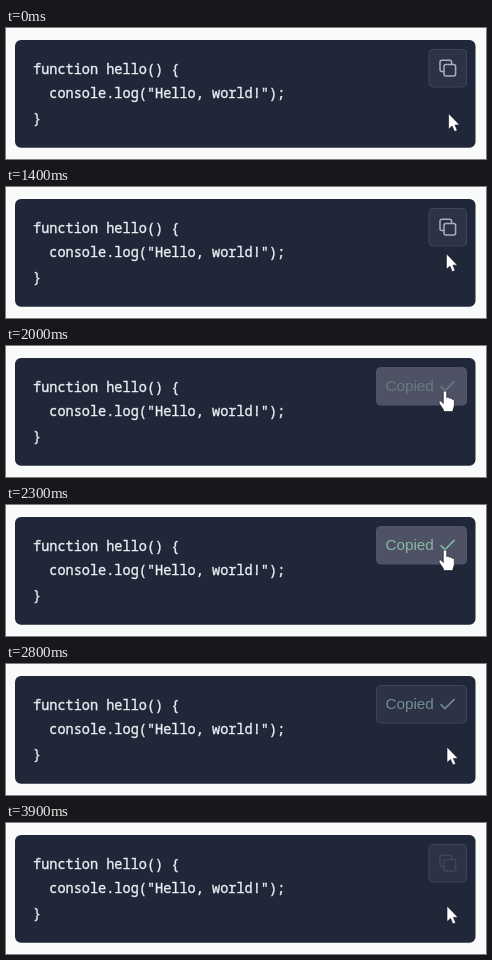
An HTML page that plays this animation: 480x131 px, repeating every 4 s.

```html
<!DOCTYPE html>
<html lang="en">
<head>
<meta charset="utf-8">
<title>Copy button</title>
<style>
  html, body { margin: 0; width: 100%; height: 100%; overflow: hidden; background: #f9fafa; }
  svg { display: block; width: 100vw; height: 100vh; }
  .code text { font: 13.57px "Noto Sans Mono", monospace; fill: #eceef2; stroke: #eceef2; stroke-width: .35; white-space: pre; }
  .label { font: 15.3px "Liberation Sans", Arial, sans-serif; }
  .line { fill: none; stroke-width: 1.5; stroke-linecap: round; stroke-linejoin: round; }
  .cursor { fill: #fff; stroke: #10141e; stroke-width: .6; stroke-linejoin: round; }
</style>
</head>
<body>
<svg viewBox="0 0 480 131">
  <rect x="9" y="12" width="460.5" height="107.7" rx="6" fill="#202739"/>
  <g class="code">
    <text x="27" y="46.4">function hello() {</text>
    <text x="27" y="70.4">  console.log("Hello, world!");</text>
    <text x="27" y="94.6">}</text>
  </g>
  <rect id="button" y="21.5" height="37.5" rx="4"/>
  <g id="icon" class="line">
    <rect x="438" y="36.6" width="11.6" height="11.4" rx="2"/>
    <path d="M437.8 43.4H436a2 2 0 0 1-2-2V34.2a2 2 0 0 1 2-2h7.6a2 2 0 0 1 2 2v2.2"/>
  </g>
  <g id="done">
    <text id="label" class="label" x="379.4" y="45">Copied</text>
    <path id="check" class="line" d="M435 40.6l4 4 9.2-9.2"/>
  </g>
  <path id="arrow" class="cursor" d="M0 0V15.6L3.5 12.4 5.9 18 8.7 16.8 6.4 11.4H11Z"/>
  <path id="hand" class="cursor" d="M-1.7 1.1C-1.7-1 1.7-1 1.7 1.1V6.2C2.3 5.4 4.3 5.6 4.5 6.9 5.3 6.2 6.9 6.6 7.1 7.9 8.1 7.4 9.3 8 9.3 9.2V13.5C9.3 16 8 17 7.8 20H-1.2C-1.4 17-4 15.4-5.8 11.6-6.5 9.9-4.5 8.8-3.2 10.4L-1.7 12Z"/>
</svg>
<script>
const LOOP = 4000, STEP = 100;
const el = id => document.getElementById(id);
const [button, icon, done, label, check, arrow, hand] =
  ["button", "icon", "done", "label", "check", "arrow", "hand"].map(el);

const clamp = v => Math.min(1, Math.max(0, v));
const mix = (a, b, k) => a + (b - a) * k;
const ramp = (t, from, to) => clamp((t - from) / (to - from));
const smooth = k => k * k * (3 - 2 * k);
const color = (a, b, k) => `rgb(${a.map((v, i) => Math.round(mix(v, b[i], k)))})`;

function pointer(t) {
  if (t < 1800) {
    const k = smooth(ramp(t, 1120, 1700));
    return [mix(442.6, 438, k), mix(85.6, 45.8, k)];
  }
  const k = smooth(ramp(t, 2300, 2800));
  return [mix(mix(438, 439, ramp(t, 1700, 2000)), 441, k), mix(45.5, 83, k)];
}

function draw(t) {
  const [x, y] = pointer(t);
  const over = y < 59.5;
  const hover = ramp(t, 1500, 1700) * (1 - ramp(t, 2500, 2800));
  const copied = t >= 1900 && t < 3900;
  const left = copied ? 370.5 : 423;

  button.setAttribute("x", left);
  button.setAttribute("width", 460.5 - left);
  button.setAttribute("fill", color([45, 50, 71], [79, 81, 100], hover));
  button.setAttribute("stroke", color([64, 68, 88], [82, 84, 103], hover));

  icon.setAttribute("stroke", color([172, 174, 184], [195, 196, 204], hover));
  icon.setAttribute("opacity", copied ? 0 : t >= 3900 ? .15 : t >= 1800 ? .4 : 1);

  const tint = color([112, 144, 142], [134, 186, 165], hover);
  label.setAttribute("fill", tint);
  check.setAttribute("stroke", tint);
  done.setAttribute("opacity", copied ? smooth(ramp(t, 1800, 2250)) * (t >= 3800 ? .4 : 1) : 0);

  for (const [shape, shown] of [[arrow, !over], [hand, over]]) {
    shape.setAttribute("transform", `translate(${x} ${y})`);
    shape.setAttribute("visibility", shown ? "visible" : "hidden");
  }
}

const start = performance.now();
function tick() {
  const t = (performance.now() - start) % LOOP;
  draw(Math.floor(t / STEP) * STEP);
  requestAnimationFrame(tick);
}
tick();
</script>
</body>
</html>
```
